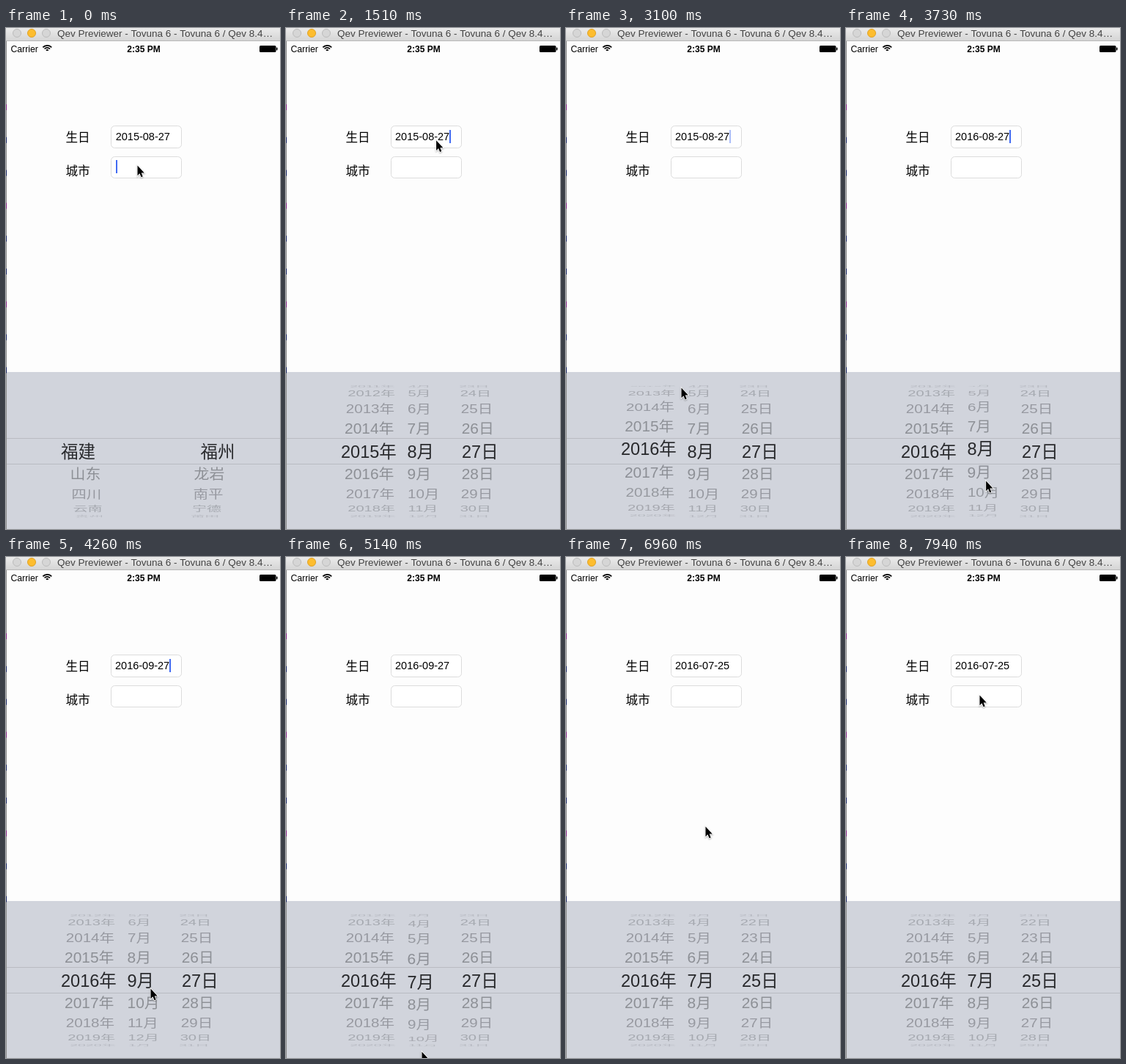
Animation, 374 px wide and 683 px high, one loop 8000 ms. Source, as an HTML page with a canvas:

```html
<!DOCTYPE html>
<html lang="zh">
<head>
<meta charset="utf-8">
<style>
html, body { margin: 0; width: 100%; height: 100%; overflow: hidden; background: #fff; }
canvas { display: block; }
</style>
</head>
<body>
<canvas id="stage" width="374" height="683"></canvas>
<script>
const ctx = document.getElementById('stage').getContext('2d');
const LOOP = 8000, STEP = 88, DATE_TAP = 1510, SNAP = 230;
const FONT = '"Liberation Sans", "Noto Sans CJK SC", "Noto Sans CJK", sans-serif';
const MID = 577, BAND = [559.5, 594.5], RADIUS = 89.5, ANGLE = 0.355, ZOOM = 1.12, ROW = 32;

// Stops of the pointer: time, x, y
const path = [
  [450, 179, 187], [1070, 204, 153], [1850, 205, 152.5], [2300, 190, 193],
  [2730, 157, 525], [3110, 157, 490], [3650, 190, 620], [4000, 197, 588], [4245, 197, 588],
  [4460, 257, 580], [4680, 188, 608], [5130, 185, 674], [5500, 249, 598], [5880, 251, 660],
  [6090, 255, 383], [6700, 191, 367], [7530, 187, 367], [7940, 182, 188]
];
// The wheels (year, month, day) follow the pointer while it drags them
const drags = [
  { wheel: 0, from: 2730, to: 3110 },
  { wheel: 1, from: 3650, to: 4000 },
  { wheel: 1, from: 4680, to: 5130 },
  { wheel: 2, from: 5500, to: 5880 }
];
const blinkStarts = [0, DATE_TAP, ...drags.flatMap(d => [d.to, d.to + SNAP])];

const smooth = u => u * u * (3 - 2 * u);
const clamp = u => Math.max(0, Math.min(1, u));
const wrap = (n, size) => ((n - 1) % size + size) % size + 1;

function pointerAt(t) {
  const i = path.findIndex(p => p[0] > t);
  if (i <= 0) return (i ? path[path.length - 1] : path[0]).slice(1);
  const [t0, x0, y0] = path[i - 1], [t1, x1, y1] = path[i];
  const u = smooth((t - t0) / (t1 - t0));
  return [x0 + (x1 - x0) * u, y0 + (y1 - y0) * u];
}

// Wheel positions, and the date last settled on
function wheelsAt(t) {
  const pos = [2015, 8, 27], settled = [...pos];
  for (const { wheel, from, to } of drags) {
    if (t < from) break;
    const moved = pointerAt(from)[1] - pointerAt(Math.min(t, to))[1];
    const p = pos[wheel] + moved / ROW, u = clamp((t - to) / SNAP);
    pos[wheel] = p + (Math.round(p) - p) * smooth(u);
    if (u === 1) settled[wheel] = pos[wheel];
  }
  return { pos, date: settled.map(n => String(n).padStart(2, '0')).join('-') };
}

function rect(color, x, y, w, h) {
  ctx.fillStyle = color;
  ctx.fillRect(x, y, w, h);
}

function text(str, x, y, size, color = '#000', weight = 400, align = 'left') {
  ctx.font = `${weight} ${size}px ${FONT}`;
  ctx.fillStyle = color;
  ctx.textAlign = align;
  ctx.fillText(str, x, y);
}

function box(x, y, w, h, r, stroke, fill) {
  ctx.beginPath();
  ctx.roundRect(x, y, w, h, r);
  if (fill) { ctx.fillStyle = fill; ctx.fill(); }
  if (stroke) { ctx.strokeStyle = stroke; ctx.lineWidth = 1; ctx.stroke(); }
}

function drawTitleBar() {
  const shade = ctx.createLinearGradient(0, 0, 0, 17);
  shade.addColorStop(0, '#ebebeb');
  shade.addColorStop(1, '#d5d5d5');
  rect(shade, 0, 0, 374, 17);
  rect('#b8b8b8', 0, 17, 374, 1);
  for (let i = 0; i < 3; i++) {
    box(9.5 + 20 * i, 1.5, 11, 11, 5.5, i === 1 ? '#dfa023' : '#bcbcbc', i === 1 ? '#fdbd2f' : '#d6d6d6');
  }
  text('Qev Previewer - Tovuna 6 - Tovuna 6 / Qev 8.4…', 70, 12, 13.5, '#424242');
}

function drawStatus() {
  text('Carrier', 6.5, 32.5, 12.2);
  text('2:35 PM', 188, 32.5, 12, '#000', 700, 'center');
  ctx.strokeStyle = '#000';
  ctx.lineWidth = 1.7;
  for (let r = 2; r < 9; r += 3.1) {
    ctx.beginPath();
    ctx.arc(56.3, 32, r, -Math.PI * 0.76, -Math.PI * 0.24);
    ctx.stroke();
  }
  box(346, 24, 22.5, 9, 1.5, null, '#000');
  box(369, 26.5, 1.5, 4, 0.7, null, '#000');
}

function drawForm(t, date) {
  const editingDate = t >= DATE_TAP;
  text('生日', 81.5, 154.5, 16.6);
  text('城市', 81.5, 200.5, 16.6);
  box(143.5, 133.5, 96, 30, 5, '#dcdcdc', '#fff');
  box(143.5, 175.5, 96, 29, 5, '#dcdcdc', '#fff');
  text(date, editingDate ? 149 : 149.7, 153, 14.5);

  const phase = (t - blinkStarts.filter(s => s <= t).pop()) % 1000 / 1000;
  ctx.globalAlpha = phase < 0.8 ? 1 - clamp((phase - 0.5) / 0.16) : clamp((phase - 0.9) / 0.1);
  if (editingDate) rect('#426bf2', 223, 139, 2, 18);
  else rect('#426bf2', 150, 180, 2, 18);
  ctx.globalAlpha = 1;
}

// x is for the plain rows, bigX for the magnified one
function drawWheel({ pos, label, x, bigX = x, align = 'left' }) {
  const base = Math.round(pos);
  for (let i = base - 5; i <= base + 5; i++) {
    const a = (i - pos) * ANGLE, str = label(i);
    if (!str || Math.abs(a) > 1.5) continue;
    const y = RADIUS * Math.sin(a), c = Math.cos(a), scale = 1 / (1 + 0.09 * (1 - c));
    const row = (zoom, clips, left, color) => {
      ctx.save();
      ctx.beginPath();
      clips.forEach(([top, bottom]) => ctx.rect(0, top, 374, bottom - top));
      ctx.clip();
      ctx.translate(187 + (left - 187) * scale, MID + y * zoom);
      ctx.scale(scale, c);
      text(str, 0, 21 * zoom * 0.37, 21 * zoom, color, 300, align);
      ctx.restore();
    };
    row(1, [[469, BAND[0]], [BAND[1], 683]], x, `rgba(40,42,46,${0.1 + 0.32 * c})`);
    row(ZOOM, [BAND], bigX, '#28292c');
  }
}

function drawPicker(t, [year, month, day]) {
  rect('#d1d4dc', 1, 469, 373, 214);
  const city = (names, x) => ({
    pos: 0, label: i => names[i], x, bigX: 187 + (x - 187) * ZOOM, align: 'center'
  });
  const cities = [
    city(['福建', '山东', '四川', '云南', '贵州'], 108),
    city(['福州', '龙岩', '南平', '宁德', '莆田'], 278)
  ];
  const date = [
    { pos: year, label: i => i + '年', x: 79.5, bigX: 75 },
    { pos: month, label: i => wrap(i, 12) + '月', x: 165.5 },
    { pos: day, label: i => wrap(i, 31) + '日', x: 240 }
  ];
  (t < DATE_TAP ? cities : date).forEach(drawWheel);
  BAND.forEach(y => rect('#b9bbc2', 1, y - 0.5, 373, 1));
}

// Sliver of the coloured code in the window behind
function drawEdge() {
  rect('#8f8f8f', 0, 18, 1, 665);
  for (let i = 0; i < 9; i++) rect(i % 3 ? '#1c2a66' : '#8a2a8a', 0, 104 + i * 32 * 1.4, 1, 8);
}

function drawPointer(t) {
  const [x, y] = pointerAt(t);
  const arrow = new Path2D('M0 0V14.5L3.3 11.4 5.6 16.7 8 15.7 5.8 10.5H10.3Z');
  ctx.save();
  ctx.translate(x + 0.5, y + 0.5);
  ctx.scale(0.9, 0.95);
  ctx.shadowColor = 'rgba(0,0,0,.3)';
  ctx.shadowBlur = 2;
  ctx.shadowOffsetY = 1;
  ctx.strokeStyle = '#fff';
  ctx.lineWidth = 1.8;
  ctx.stroke(arrow);
  ctx.shadowColor = 'transparent';
  ctx.fillStyle = '#000';
  ctx.fill(arrow);
  ctx.restore();
}

function frame(now) {
  // The screen refreshes in steps, as a screen recording does
  const t = Math.floor(now % LOOP / STEP) * STEP + 20;
  const { pos, date } = wheelsAt(t);
  rect('#fdfdfd', 0, 0, 374, 683);
  drawTitleBar();
  drawStatus();
  drawForm(t, date);
  drawPicker(t, pos);
  drawEdge();
  drawPointer(t);
  requestAnimationFrame(frame);
}
requestAnimationFrame(frame);
</script>
</body>
</html>
```
